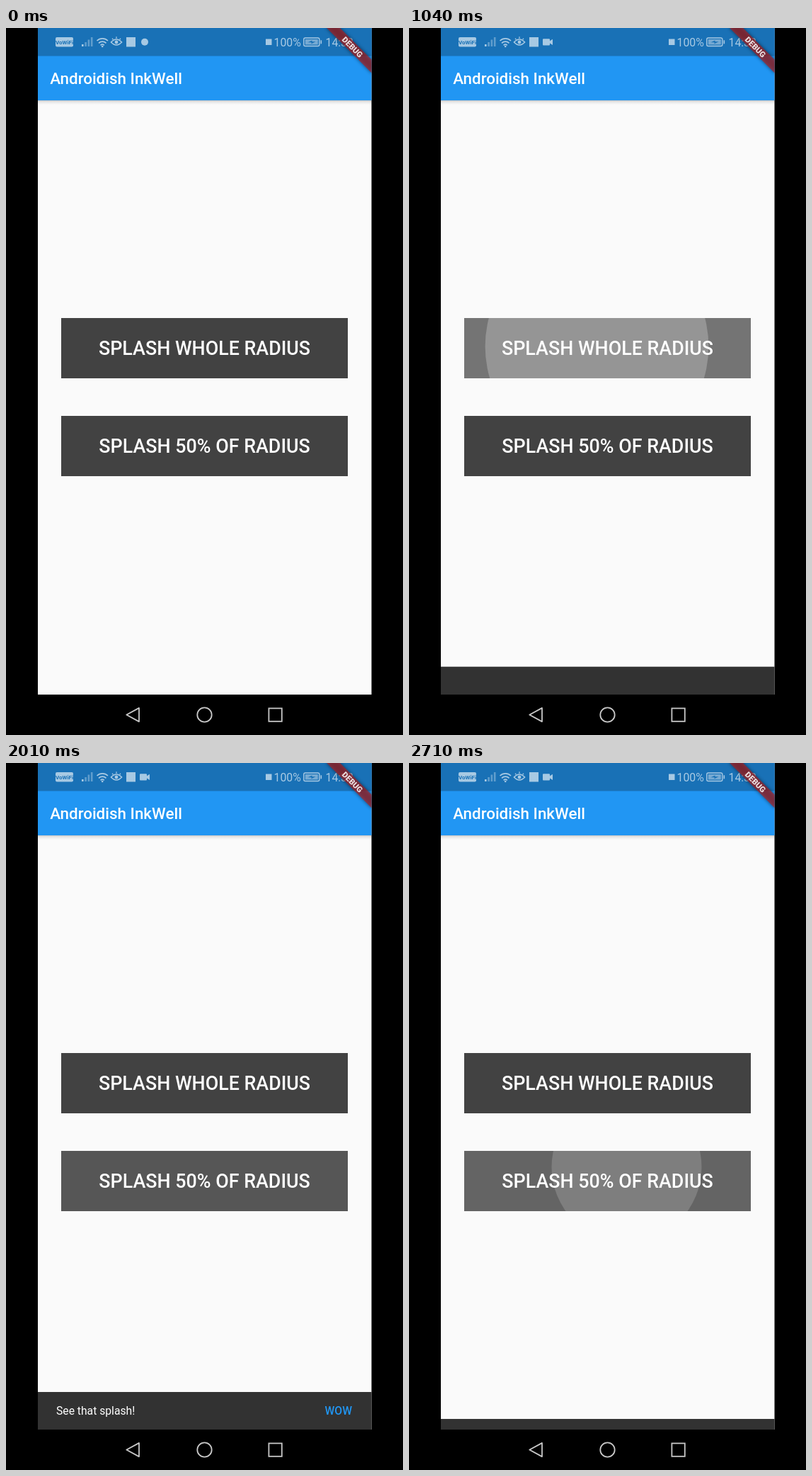
Recreate the animation shown at these times as an HTML page. Size 561 by 997 pixels, loop 2.81 s.

```html
<!DOCTYPE html>
<html lang="en">
<head>
<meta charset="utf-8">
<title>Androidish InkWell</title>
<style>
  html, body { margin: 0; width: 100%; height: 100%; overflow: hidden; background: #000; }
  #stage { display: block; width: 561px; height: 997px; }
  text { font-family: Roboto, sans-serif; fill: #fff; }
  .medium { font-weight: 500; }
  .label { font-size: 26.85px; text-anchor: middle; }
  .line { fill: none; stroke: #fff; }
</style>
</head>
<body>
<svg id="stage" viewBox="0 0 561 997">
  <defs>
    <linearGradient id="shade" x2="0" y2="1">
      <stop stop-color="#000" stop-opacity=".3"/>
      <stop offset=".4" stop-color="#000" stop-opacity=".09"/>
      <stop offset="1" stop-color="#000" stop-opacity="0"/>
    </linearGradient>
  </defs>

  <svg width="516.5" height="940">
    <rect x="45" width="472" height="940" fill="#fafafa"/>
    <rect x="45" y="101" width="472" height="7" fill="url(#shade)"/>
    <rect x="45" width="472" height="102" fill="#2196f3"/>
    <rect x="45" width="472" height="39.5" fill="#1971b6"/>
    <text class="medium" x="62.2" y="79" font-size="22.4">Androidish InkWell</text>

    <g id="status" opacity=".62">
      <rect x="70" y="13" width="25" height="13.5" rx="2" fill="#fff"/>
      <text x="82.5" y="23" font-size="8" font-weight="700" text-anchor="middle" style="fill:#1971b6">VoWiFi</text>
      <path d="M107 26v-3h2.6v3z" fill="#fff"/>
      <path d="M111.3 26v-6h2.6v6zM115.6 26v-9.5h2.6v9.5zM119.9 26v-13h2.6v13z" fill="#fff" opacity=".5"/>
      <g class="line" stroke-width="1.7">
        <path d="M128.5 18a11 11 0 0 1 15.5 0M131 21.3a7.5 7.5 0 0 1 10.5 0M133.6 24.3a4 4 0 0 1 5.2 0"/>
        <path d="M148.5 20q7.5-8 15 0q-7.5 8-15 0z"/>
        <path d="M150 14.8l1.5 1.6M156 12.3v2.4M162 14.8l-1.5 1.6" stroke-width="1.3"/>
      </g>
      <circle cx="136.2" cy="26" r="1.3" fill="#fff"/>
      <circle cx="156" cy="20" r="2.4" fill="#fff"/>
      <rect x="170" y="13" width="13" height="13.5" fill="#fff"/>
      <circle id="plug" cx="196" cy="19.8" r="5" fill="#fff"/>
      <path id="camera" d="M190 15.3h8q1 0 1 1v2l4-2.6v8.4l-4-2.6v2q0 1-1 1h-8q-1 0-1-1v-7.2q0-1 1-1z" fill="#fff"/>
      <rect x="367" y="15.5" width="8.5" height="8.5" fill="#fff"/>
      <text x="378.5" y="26" font-size="15.8">100%</text>
      <rect class="line" x="420.8" y="14" width="22" height="11.5" rx="2" stroke-width="1.4"/>
      <rect x="422.8" y="16" width="18" height="7.5" fill="#fff" opacity=".65"/>
      <path d="M444.5 17.3h1.6v5h-1.6z" fill="#fff"/>
      <path d="M426.5 20.2l6-2.7v1.7h5l-6 3v-2z" fill="#1971b6"/>
      <text x="451.5" y="26" font-size="15.8">14:32</text>
    </g>

    <g transform="translate(516.5) rotate(45)">
      <rect x="-45" y="31.4" width="90" height="13.4" opacity=".5" style="filter:blur(2.5px)"/>
      <rect x="-45" y="31.4" width="90" height="13.4" fill="#b71c1c" fill-opacity=".627"/>
      <text y="42.1" font-size="11.2" font-weight="900" text-anchor="middle" opacity=".85">DEBUG</text>
    </g>

    <g id="buttons"></g>

    <g id="snackbar">
      <rect x="45" width="472" height="54" fill="#323232"/>
      <g id="message">
        <text x="71" y="32.3" font-size="15.7">See that splash!</text>
        <text class="medium" x="450.5" y="32.3" font-size="15.7" style="fill:#2196f3">WOW</text>
      </g>
    </g>
  </svg>

  <g class="line" stroke-width="1.8" style="stroke:#c8c8c8">
    <path d="M170.3 968.5l17.7-9.6v19.2z" stroke-linejoin="round"/>
    <circle cx="280.5" cy="968.5" r="10.2"/>
    <rect x="371.4" y="959.4" width="18.4" height="18.4"/>
  </g>
</svg>

<script>
const LOOP = 2810;
// The screen refreshes only at these times.
const TICKS = [0, 100, 730, 830, 940, 1040, 1140, 1240, 1340, 1440,
               2010, 2110, 2210, 2510, 2610, 2710];
const SNACK_MS = 495, SNACK_HEIGHT = 53;

const $ = id => document.getElementById(id);
const clamp = v => Math.min(1, Math.max(0, v));
const ramp = (t, start, length) => clamp((t - start) / length);

// cubic-bezier(.4, 0, .2, 1)
function fastOutSlowIn(x) {
  let lo = 0, hi = 1;
  for (let i = 0; i < 24; i++) {
    const s = (lo + hi) / 2, r = 1 - s;
    if (1.2 * r * r * s + .6 * r * s * s + s ** 3 < x) lo = s; else hi = s;
  }
  return lo * lo * (3 - 2 * lo);
}

const buttons = [
  { label: 'SPLASH WHOLE RADIUS', y: 409, cx: 187.5, cy: 40, radius: 212, press: 630, tap: 941 },
  { label: 'SPLASH 50% OF RADIUS', y: 547, cx: 229.5, cy: 23, radius: 106, press: 1910, tap: 2411 },
];

$('buttons').innerHTML = buttons.map(b => `
  <svg x="78" y="${b.y}" width="405" height="85">
    <rect width="405" height="85" fill="#424242"/>
    <rect width="405" height="85" fill="#fff"/>
    <circle cx="${b.cx}" cy="${b.cy}" fill="#fff"/>
    <text class="medium label" x="202.5" y="52">${b.label}</text>
  </svg>`).join('');
buttons.forEach((b, i) => {
  const box = $('buttons').children[i];
  b.highlight = box.children[1];
  b.splash = box.children[2];
});

function drawButton(b, t) {
  const fade = 1 - ramp(t, b.tap + 210, 282);
  const growth = 1 - (1 - ramp(t, b.tap, 250)) ** 2;
  b.highlight.setAttribute('opacity', .263 * ramp(t, b.press, 250) * fade);
  b.splash.setAttribute('opacity', .24 * fade);
  b.splash.setAttribute('r', t > b.tap ? b.radius * (.3 + .7 * growth) : 0);
}

function drawSnackbar(t) {
  const entering = t < 2000;
  const p = entering ? ramp(t, 805, SNACK_MS) : 1 - ramp(t, 2348, SNACK_MS);
  const top = 940 - SNACK_HEIGHT * fastOutSlowIn(p);
  $('snackbar').setAttribute('transform', `translate(0 ${top})`);
  $('message').setAttribute('opacity', entering ? fastOutSlowIn(ramp(p, .72, .28)) : 1);
}

function draw(now) {
  const t = TICKS.findLast(tick => tick <= now % LOOP);
  buttons.forEach(b => drawButton(b, t));
  drawSnackbar(t);
  $('plug').setAttribute('opacity', t < 100 ? 1 : 0);
  $('camera').setAttribute('opacity', t < 100 ? 0 : 1);
}

const start = performance.now();
function loop() {
  draw(performance.now() - start);
  requestAnimationFrame(loop);
}
loop();
</script>
</body>
</html>
```
